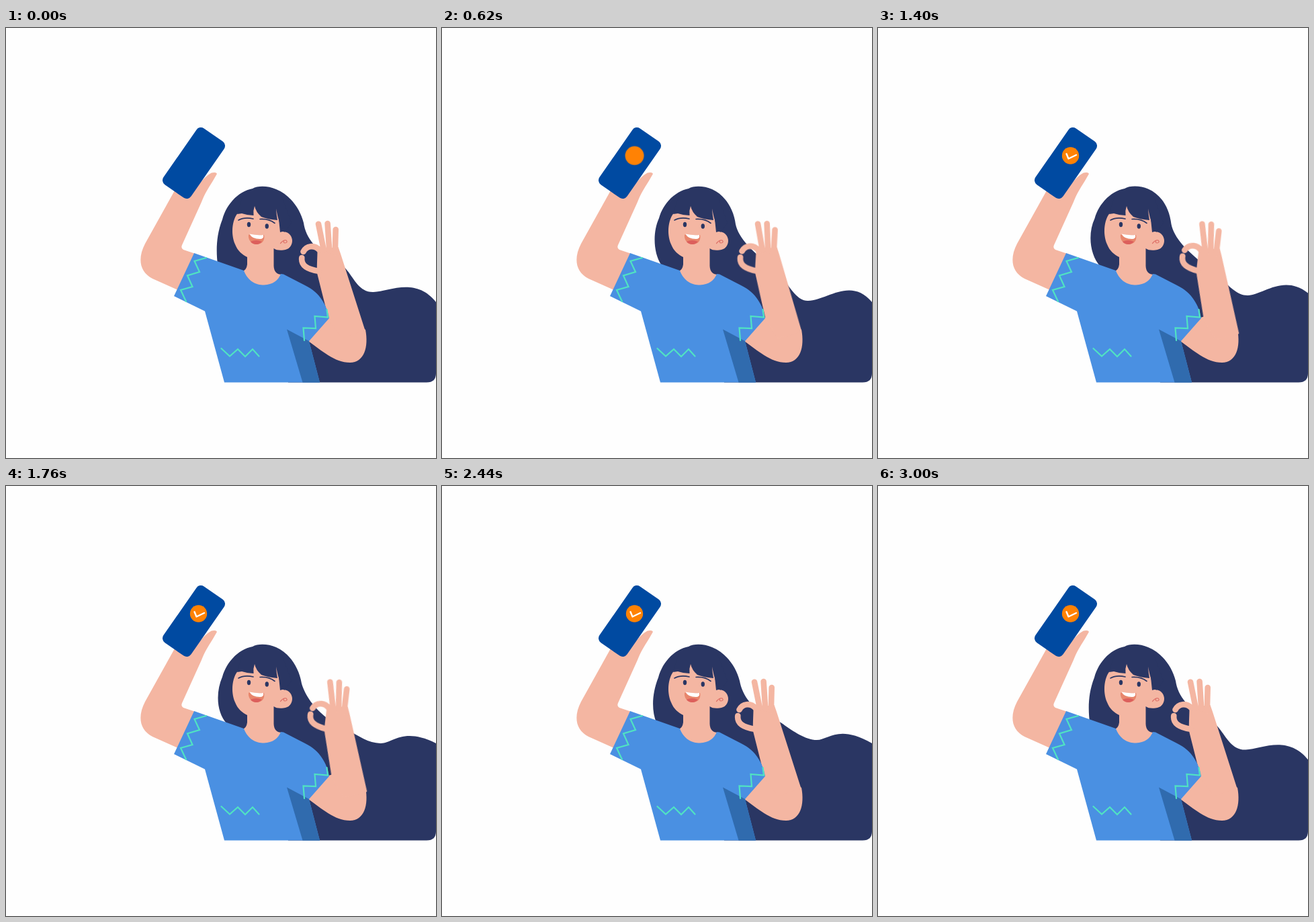
Animation of 640 by 640 pixels, one loop 3.02 s. Source, as an HTML page:

```html
<!DOCTYPE html>
<html lang="en">
<head>
<meta charset="utf-8">
<title>Woman with phone</title>
<style>
  :root { --loop: 3020ms; --skin: #f4b6a2; --navy: #2a3663; }
  html, body { margin: 0; width: 100%; height: 100%; overflow: hidden; background: #fefefe; }
  svg { display: block; width: 100vw; height: 100vh; }
  .skin { fill: var(--skin); }
  .navy { fill: var(--navy); }
  .line { fill: none; stroke-linecap: round; stroke-linejoin: round; }
  .finger { stroke: var(--skin); stroke-width: 8.6; }
  .brow { stroke: var(--navy); stroke-width: 1.6; }
  .zigzag { fill: none; stroke: #50e3c2; stroke-width: 2.2; stroke-linecap: round; }

  #hair { animation: wave var(--loop) linear infinite; }
  #hand { transform-origin: 474px 487px; animation: swing var(--loop) cubic-bezier(.33, 0, .67, 1) infinite; }
  #badge { transform-origin: 286.5px 190px; animation: pop var(--loop) cubic-bezier(.33, 0, .67, 1) infinite; }
  #tick { stroke: #fff; stroke-width: 2.4; stroke-dasharray: 1 2; animation: draw var(--loop) linear infinite; }

  @keyframes wave {
    0%, 100% { d: path("M315 352C313 335 312 310 322 285C328 262 346 243 367 239C375 234 391 235 402 240C424 249 438 270 443 290C446 312 462 334 500 353C516 365 522 394 547 393C570 392 610 370 640 408L640 514Q640 527.5 626 527.5L420 527.5L380 400Z"); }
    20.53% { d: path("M326 352C315 335 313 305 323 283C329 261 347 243 367 239C375 234 391 235 402 240C420 248 434 268 437 292C441 312 462 334 494 357C512 372 524 407 545 406C572 406 608 370 640 408L640 514Q640 527.5 626 527.5L420 527.5L380 400Z"); }
    34.44% { d: path("M333 356C317 338 312 305 323 283C329 261 347 243 367 239C375 234 391 234 402 239C421 247 431 264 433 290C436 312 456 326 490 358C516 384 524 413 543 413C568 413 616 373 640 406L640 514Q640 527.5 626 527.5L420 527.5L380 400Z"); }
    58.28% { d: path("M329 354C313 337 312 307 322 284C328 262 346 243 367 239C375 234 391 235 402 240C422 249 436 270 440 294C445 312 462 338 494 356C516 365 535 383 557 383C575 384 590 358 640 383L640 514Q640 527.5 626 527.5L420 527.5L380 400Z"); }
    70.2% { d: path("M323 352C312 335 312 307 322 285C328 262 346 243 367 239C375 234 391 235 402 240C424 249 437 270 442 290C447 312 462 334 494 349C515 358 542 370 566 370C585 370 593 342 640 368L640 514Q640 527.5 626 527.5L420 527.5L380 400Z"); }
    80.79% { d: path("M319 352C312 335 312 310 322 285C328 262 346 243 367 239C375 234 391 235 402 240C424 249 438 270 443 290C447 312 462 334 494 346C510 354 535 378 558 378C575 378 590 354 640 383L640 514Q640 527.5 626 527.5L420 527.5L380 400Z"); }
  }
  @keyframes swing {
    0%, 10.93% { transform: rotate(0deg); }
    38.08%, 57.62% { transform: rotate(5.1deg); }
    74.5%, 100% { transform: rotate(0deg); }
  }
  @keyframes pop {
    0%, 9.93% { transform: scale(0); }
    18.54% { transform: scale(1.13); }
    25.2%, 100% { transform: scale(1); }
  }
  @keyframes draw {
    0%, 30.8% { stroke-dashoffset: 1.05; }
    43%, 100% { stroke-dashoffset: 0; }
  }
</style>
</head>
<body>
<svg viewBox="0 0 640 640">
  <path id="hair" class="navy" d=""/>

  <!-- raised arm and phone -->
  <path class="skin" d="M251 242L207 321C196 342 198 363 218 373L258 391L282 336L264 330Q260 328 262 323L291 259C297 243 306 232 314 217Q313 214 306 215.500C298 219 289 230 280 242Z"/>
  <rect x="254.500" y="150" width="50" height="102" rx="8" fill="#004aa1" transform="rotate(34.8 279.5 201)"/>
  <circle id="badge" cx="286.500" cy="190" r="12.700" fill="#ff8204"/>
  <path id="tick" class="line" pathLength="1" d="M280.500 187.300L283.500 194.500L295 189"/>

  <!-- face and neck -->
  <path class="skin" d="M349 271C336 282 334 306 341 322C345 332 351 337 359 341L359 352Q358 360 352 362L360 390L404 390L411 367Q399 367 398.500 354L398.500 328C402 331 408 331 413 330.500A13.300 13.700 0 1 0 408 304L404 265L370 258Z"/>
  <path class="navy" d="M344 277L351 276Q360 279 368.500 279Q367.500 272 370 265Q372 274 380 281Q390 285 404 286Q402.500 278 402 269Q406 292 414 304L425 290L410 250L352 250Z"/>
  <ellipse class="navy" cx="361.500" cy="292.500" rx="2.700" ry="3.700"/>
  <ellipse class="navy" cx="388.300" cy="295" rx="2.700" ry="3.700"/>
  <path class="line brow" d="M346 286Q355 281 368 284M378 284.500Q391 283.500 400 290.500"/>
  <path fill="#e8866c" d="M361 307.500Q372 308.500 384 308C386 317 380 322 373 322C365 322 360 315 361 307.500Z"/>
  <path fill="#dc5f5c" d="M364 318Q372 314 381 318Q377 322 373 322Q367 322 364 318Z"/>
  <path fill="#fff" d="M362.500 306.500Q373 309 383 308Q384 314 378 314Q366 314 362.500 306.500Z"/>
  <path class="line" stroke="#de7168" stroke-width="1.200" d="M408.500 320.500Q413 315 417 316Q420 319 415.500 320Q412.500 319.500 413.500 317.500"/>

  <!-- other arm -->
  <path class="skin" d="M480 431L450 466C470 480 489 498 512 498C533 498 540 475 535 449L500 425Z"/>
  <g id="hand">
    <path class="skin" d="M463.500 330Q470 326 476 328L494.500 326L498 336L534.300 449.500L500 462L480.500 434.500L463.500 367C462 358 463.500 344 463.500 330Z"/>
    <path class="line finger" d="M465 291.700L473 331M478.600 291L481.300 332M490.700 300L489.800 334M442.500 333C447 324 459 322 467 331M440.300 342C439 353 447 359 466 362"/>
  </g>

  <!-- shirt -->
  <path fill="#4a90e2" d="M280 335L354 361C360 377 372 382.500 384 382.500C397 382 405 376 409 366L413 366.500L445 383C468 394 478 414 481 432L451 466L467 527.500L325 527.500L296 421.500L250 399Z"/>
  <path fill="#306bae" d="M418 448.500L451 466L467 527.500L441.500 527.500Z"/>
  <path class="zigzag" d="M298 342L280.500 347L288 363L270 368.500L277.500 385L260 390L268 407"/>
  <path class="zigzag" d="M477.500 419L479 430.500L459.500 429L461 447L442.500 446.500L444 465"/>
  <path class="zigzag" d="M320.500 477L333 488.500L345 478L356 489L367 478L376.500 488.500"/>
</svg>
</body>
</html>
```
